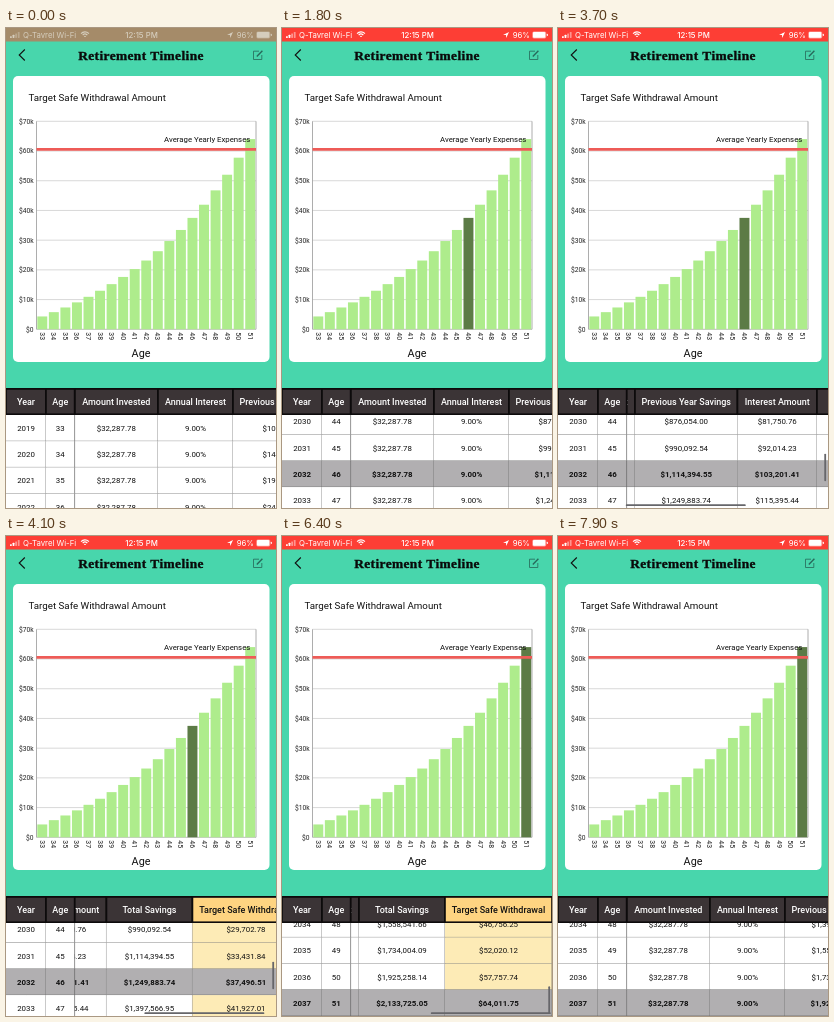
Recreate the animation shown at these times as an HTML page with a canvas. Size 270x480 px, loop 8000 ms.

```html
<!DOCTYPE html>
<html lang="en">
<head>
<meta charset="utf-8">
<title>Retirement Timeline</title>
<style>
  html, body { margin: 0; width: 100%; height: 100%; overflow: hidden; background: #48d6ac; }
  canvas { display: block; width: 270px; height: 480px; }
</style>
</head>
<body>
<canvas id="stage"></canvas>
<script>
const W = 270, H = 480, LOOP = 8000;
const canvas = document.getElementById('stage');
const g = canvas.getContext('2d');
const dpr = window.devicePixelRatio || 1;
canvas.width = W * dpr;
canvas.height = H * dpr;

// Savings model: yearly deposit, 9% growth, 3% safe withdrawal
const DEPOSIT = 32287.7804;
const money = v => '$' + v.toLocaleString('en-US', { minimumFractionDigits: 2, maximumFractionDigits: 2 });
const rows = [];
for (let i = 0, prev = 100000; i < 19; i++) {
  const interest = (prev + DEPOSIT) * 0.09;
  const total = prev + DEPOSIT + interest;
  const target = total * 0.03;
  rows.push({
    age: 33 + i, target,
    cells: [2019 + i, 33 + i, money(DEPOSIT), '9.00%', money(prev), money(interest), money(total), money(target)]
  });
  prev = total;
}

const heads = ['Year', 'Age', 'Amount Invested', 'Annual Interest', 'Previous Year Savings',
  'Interest Amount', 'Total Savings', 'Target Safe Withdrawal'];
const edges = [0, 40, 68.6, 152, 227, 329.5, 409, 495, 602];
const HEAD_TOP = 360, BODY_TOP = 387, ROW = 26.2;
const MAX_X = edges[8] - W, MAX_Y = rows.length * ROW - (H - BODY_TOP);

function rect(x, y, w, h, color) {
  g.fillStyle = color;
  g.fillRect(x, y, w, h);
}

function path(color, width, ...pts) {
  g.strokeStyle = color;
  g.lineWidth = width;
  g.beginPath();
  pts.forEach(([x, y]) => g.lineTo(x, y));
  g.stroke();
}

function pill(x, y, w, h, r, color) {
  g.fillStyle = color;
  g.beginPath();
  g.roundRect(x, y, w, h, r);
  g.fill();
}

// y is the middle of the capitals
function text(s, x, y, size, { weight = 400, color = '#111', align = 'center', font = 'Roboto' } = {}) {
  g.font = `${weight} ${size}px "${font}", sans-serif`;
  g.fillStyle = color;
  g.textAlign = align;
  g.fillText(s, x, y + size * 0.355);
}

function clip(x, y, w, h, draw) {
  g.save();
  g.beginPath();
  g.rect(x, y, w, h);
  g.clip();
  draw();
  g.restore();
}

// Motion
const clamp = v => Math.min(1, Math.max(0, v));
const smooth = p => p * p * (3 - 2 * p);
const swipe = p => smooth(Math.pow(p, 0.8));
function move(t, keys, ease) {
  let v = 0;
  for (const [start, end, delta] of keys) v += delta * ease(clamp((t - start) / (end - start)));
  return v;
}
const scrollX = t => move(t, [[2750, 3600, 150], [3700, 4250, MAX_X - 150], [6400, 7200, -168], [7250, 7750, 168 - MAX_X]], swipe);
const scrollY = t => move(t, [[1380, 1800, 294.7], [5100, 5600, MAX_Y - 294.7]], smooth);
const selectedAge = t => t < 1400 ? 0 : t < 4900 ? 46 : 51;
const barsAlpha = t => t < 4400
  ? clamp((t - 2700) / 100) * clamp((4450 - t) / 200)
  : clamp((t - 6300) / 100) * clamp((7900 - t) / 200);

function statusBar(t) {
  const bg = t < 100 ? '#a58b69' : t < 200 ? '#d3644b' : '#fd3e35';
  const ink = t < 100 ? '#d5cdbd' : t < 200 ? '#eee6dd' : '#fff';
  const style = { color: ink, font: 'Inter' };
  rect(0, 0, W, 13.5, bg);
  for (let i = 0; i < 4; i++) {
    g.globalAlpha = i < 2 ? 1 : 0.45;
    pill(4 + i * 2.6, 8.2 - i * 1.4, 1.8, 1.8 + i * 1.4, 0.4, ink);
  }
  g.globalAlpha = 1;
  text('Q-Tavrel Wi-Fi', 17, 6.8, 7.8, { ...style, align: 'left' });
  g.strokeStyle = ink;
  g.lineWidth = 1.2;
  for (const r of [1, 3.2, 5.4]) {
    g.beginPath();
    g.arc(79, 9.3, r, -Math.PI * 0.76, -Math.PI * 0.24);
    g.stroke();
  }
  text('12:15 PM', 135.5, 6.8, 7.8, { ...style, weight: 500 });
  g.fillStyle = ink;
  g.beginPath();
  [[221, 7], [227, 4], [224.2, 10], [224, 7.1]].forEach(p => g.lineTo(...p));
  g.fill();
  text('96%', 248, 6.8, 7.8, { ...style, align: 'right' });
  g.globalAlpha = 0.5;
  pill(250.3, 3.4, 14, 7, 1.6, ink);
  g.globalAlpha = 1;
  pill(251, 4.1, 12.2, 5.6, 1, ink);
  pill(264.8, 5.7, 1, 2.4, 0.5, ink);
}

function titleBar() {
  const title = 'Retirement Timeline', size = 13.4, y = 27;
  path('#111', 1.1, [18.8, 21.5], [13.2, 27], [18.8, 32.5]);
  g.letterSpacing = '0.4px';
  text(title, 135, y, size, { weight: 700, font: 'Liberation Serif', color: '#0a0a0a' });
  g.strokeStyle = '#0a0a0a';
  g.lineWidth = 0.35;
  g.strokeText(title, 135, y + size * 0.355);
  g.letterSpacing = '0px';
  path('#27695a', 0.8, [253, 23.2], [247.5, 23.2], [247.5, 31.5], [255.8, 31.5], [255.8, 27]);
  path('#27695a', 1.4, [250.8, 28.4], [256.4, 22.8]);
}

function chart(age) {
  const y = v => 301.3 - v / 70000 * 208;
  const left = 30.5, right = 250, step = (right - left) / rows.length;
  pill(7, 48, 256.5, 286, 5, '#fff');
  text('Target Safe Withdrawal Amount', 22.5, 69.8, 9.75, { align: 'left' });
  for (let k = 0; k <= 70; k += 10) {
    path(k ? '#cfcfcf' : '#aaa', 0.8, [left, y(k * 1000)], [right, y(k * 1000)]);
    text(k ? `$${k}k` : '$0', 27.6, y(k * 1000), 6.7, { align: 'right', color: '#222' });
  }
  path('#999', 0.8, [left, y(70000)], [left, y(0)]);
  path('#999', 0.8, [right, y(70000)], [right, y(0)]);
  rows.forEach((row, i) => {
    const x = left + i * step + 0.8, top = y(row.target);
    rect(x, top, step - 1.6, y(0) - top, row.age === age ? '#5c7b46' : '#aeec8c');
    g.save();
    g.translate(x + step / 2 - 0.8, 304.3);
    g.rotate(Math.PI / 2);
    text(row.age, 0, 0, 6.9, { align: 'left', color: '#222' });
    g.restore();
  });
  path('#ee5b57', 2.7, [left, 121.4], [right, 121.4]);
  text('Average Yearly Expenses', 244.3, 111, 7.8, { align: 'right' });
  text('Age', 135, 324.8, 10.8);
}

function columns(first, last, dx, dy, age) {
  clip(0, BODY_TOP, W, H - BODY_TOP, () => rows.forEach((row, r) => {
    const y = BODY_TOP + r * ROW - dy;
    if (y > H || y + ROW < BODY_TOP) return;
    const on = row.age === age;
    for (let c = first; c <= last; c++) {
      const x = edges[c] - dx, w = edges[c + 1] - edges[c];
      rect(x, y, w, ROW, on ? '#b1afb1' : c === 7 ? '#fdebb6' : '#fff');
      path('#666', 0.7, [x, y + ROW], [x + w, y + ROW], [x + w, y]);
      text(row.cells[c], x + w / 2, y + ROW / 2, 7.9, { weight: on ? 700 : 400 });
    }
  }));
  for (let c = first; c <= last; c++) {
    const x = edges[c] - dx, w = edges[c + 1] - edges[c], gold = c === 7;
    rect(x - 1, HEAD_TOP, w + 2, BODY_TOP - HEAD_TOP, '#0c0a0b');
    rect(x + 0.8, HEAD_TOP + 1.8, w - 1.6, BODY_TOP - HEAD_TOP - 3.4, gold ? '#fed481' : '#3b3436');
    text(heads[c], x + w / 2, 373.4, 9, { weight: 500, color: gold ? '#111' : '#fff' });
  }
}

function table(t, age) {
  const dx = scrollX(t), dy = scrollY(t);
  rect(0, HEAD_TOP, W, H - HEAD_TOP, '#fff');
  columns(2, 7, dx, dy, age);
  columns(0, 1, 0, dy, age);

  const view = H - HEAD_TOP, full = rows.length * ROW + BODY_TOP - HEAD_TOP;
  g.globalAlpha = barsAlpha(t);
  pill(1 + dx / edges[8] * 268, 476.3, 120, 1.8, 0.9, '#66666a');
  pill(266.3, HEAD_TOP + dy / full * 117, 1.8, view * view / full, 0.9, '#66666a');
  g.globalAlpha = 1;
}

function draw(now) {
  const t = Math.floor(now % LOOP / 100) * 100; // ten steps a second
  const age = selectedAge(t);
  g.setTransform(dpr, 0, 0, dpr, 0, 0);
  rect(0, 0, W, H, '#48d6ac');
  statusBar(t);
  titleBar();
  chart(age);
  table(t, age);
}

const start = performance.now();
function frame() {
  draw(performance.now() - start);
  requestAnimationFrame(frame);
}
frame();
</script>
</body>
</html>
```
